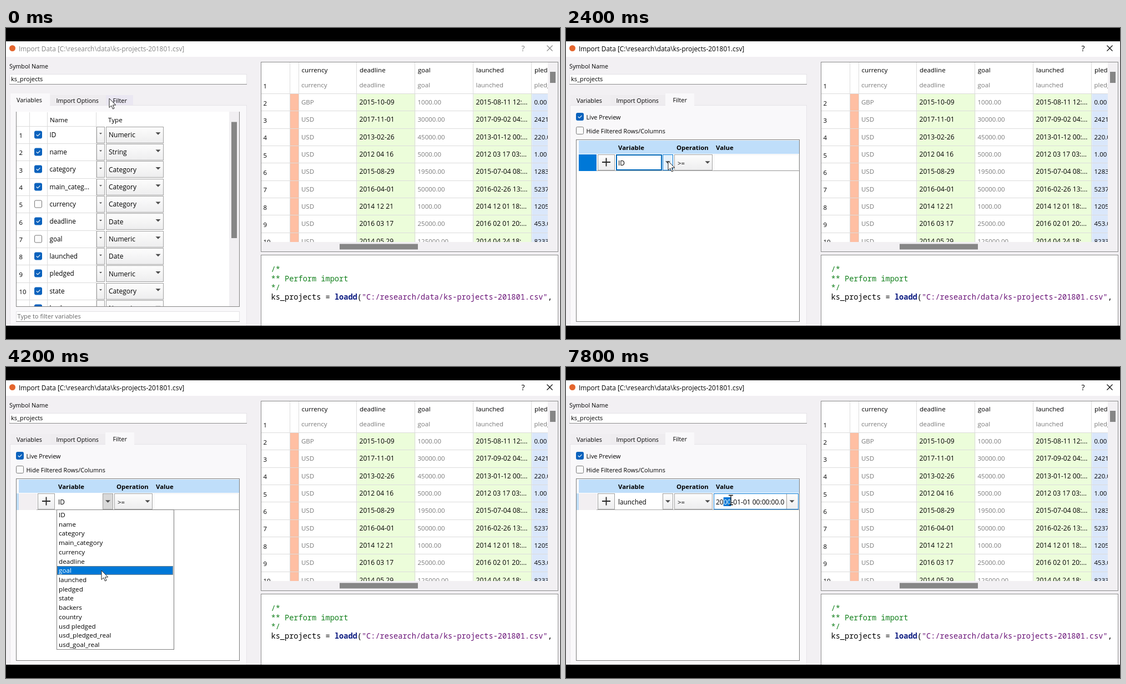
An HTML page with a canvas for the animation above (8000 ms loop, 998 by 561 pixels).

```html
<!DOCTYPE html>
<html lang="en">
<head>
<meta charset="utf-8">
<title>Import Data</title>
<style>
html, body { margin: 0; width: 100%; height: 100%; overflow: hidden; background: #000; }
canvas { display: block; width: 998px; height: 561px; }
</style>
</head>
<body>
<canvas id="stage" width="998" height="561"></canvas>
<script>
const ctx = document.getElementById('stage').getContext('2d');
const LOOP = 8000, STEP = 200, ROW = 31.34, ITEM = 16.71;
const BLUE = '#0078d7', GREY = '#7a7a7a', INK = '#000', GRID = '#dcdcdc', EDGE = '#a0a0a0';

const NAMES = ['ID', 'name', 'category', 'main_category', 'currency', 'deadline', 'goal', 'launched',
  'pledged', 'state', 'backers', 'country', 'usd pledged', 'usd_pledged_real', 'usd_goal_real'];
const TYPES = ['Numeric', 'String', 'Category', 'Category', 'Category', 'Date', 'Numeric', 'Date',
  'Numeric', 'Category', 'Numeric'];
const PREVIEW = [
  'currency|deadline|goal|launched|pledged',
  'GBP|2015-10-09|1000.00|2015-08-11 12:...|0.00',
  'USD|2017-11-01|30000.00|2017-09-02 04:...|2421.00',
  'USD|2013-02-26|45000.00|2013-01-12 00:...|220.00',
  'USD|2012 04 16|5000.00|2012 03 17 03:...|1.00',
  'USD|2015-08-29|19500.00|2015-07-04 08:...|1283.00',
  'USD|2016-04-01|50000.00|2016-02-26 13:...|5237.00',
  'USD|2014 12 21|1000.00|2014 12 01 18:...|1205.00',
  'USD|2016 03 17|25000.00|2016 02 01 20:...|453.00',
  'USD|2014 05 29|125000.00|2014 04 24 18:...|8233.00'
].map(r => r.split('|'));
const COLS = [528, 632.5, 737.5, 842.5, 947.5];

// time, x, y of the pointer
const PATH = [[0, 186, 127], [200, 205, 127], [1200, 205, 127], [2400, 184, 240], [3000, 183, 242],
  [3400, 183, 244], [4200, 172, 367], [4600, 171, 388], [5200, 171, 388], [6400, 286, 242],
  [7000, 286, 242], [7800, 297, 240], [8000, 297, 240]];

function box(x, y, w, h, fill, line) {
  if (fill) { ctx.fillStyle = fill; ctx.fillRect(x, y, w, h); }
  if (line) {
    ctx.strokeStyle = line;
    ctx.lineWidth = 1;
    ctx.strokeRect(x + .5, y + .5, w - 1, h - 1);
  }
}

function text(s, x, mid, size = 10.9, color = INK, weight = 400, family = '"Open Sans", sans-serif') {
  ctx.font = `${weight} ${size}px ${family}`;
  ctx.fillStyle = color;
  ctx.fillText(s, x, mid + 4);
}

function poly(points, fill, line, width = 1) {
  ctx.beginPath();
  points.forEach(([x, y]) => ctx.lineTo(x, y));
  ctx.closePath();
  if (fill) { ctx.fillStyle = fill; ctx.fill(); }
  if (line) { ctx.strokeStyle = line; ctx.lineWidth = width; ctx.stroke(); }
}

function stroke(color, width, ...segments) {
  ctx.strokeStyle = color;
  ctx.lineWidth = width;
  ctx.beginPath();
  for (const [x1, y1, x2, y2] of segments) { ctx.moveTo(x1, y1); ctx.lineTo(x2, y2); }
  ctx.stroke();
}

function clipped(x, y, w, h, draw) {
  ctx.save();
  ctx.beginPath();
  ctx.rect(x, y, w, h);
  ctx.clip();
  draw();
  ctx.restore();
}

function arrowDown(x, y, r = 4.5) {
  poly([[x - r, y - r / 2], [x + r, y - r / 2], [x, y + r / 2]], '#4c4c4c');
}

function button(x, y, w, h, line = EDGE, tint) {
  const g = ctx.createLinearGradient(0, y, 0, y + h);
  g.addColorStop(0, tint || '#fdfdfd');
  g.addColorStop(1, tint || '#ededee');
  box(x, y, w, h, g, line);
}

function check(x, y, on) {
  ctx.beginPath();
  ctx.roundRect(x - 6.5, y - 6.5, 13, 13, 2);
  ctx.fillStyle = on ? '#0a62bd' : '#fbfbfb';
  ctx.fill();
  ctx.strokeStyle = on ? '#0a62bd' : '#777';
  ctx.lineWidth = 1;
  ctx.stroke();
  if (on) stroke('#fff', 1.1, [x - 3.2, y, x - .8, y + 2.4], [x - .8, y + 2.4, x + 3.4, y - 2.2]);
}

function pointerAt(t) {
  const i = Math.max(1, PATH.findIndex(p => p[0] >= t));
  const [t0, x0, y0] = PATH[i - 1], [t1, x1, y1] = PATH[i];
  const u = (t - t0) / (t1 - t0), e = u * u * (3 - 2 * u);
  return [x0 + (x1 - x0) * e, y0 + (y1 - y0) * e];
}

function drawWindow(active) {
  box(0, 0, 998, 561, '#000');
  box(0, 24, 998, 513, '#f2f0f3');
  box(0, 24, 998, 28, '#fff');
  ctx.fillStyle = '#e4652d';
  ctx.beginPath();
  ctx.arc(11.5, 36.5, 5.5, 0, 7);
  ctx.fill();
  const c = active ? INK : '#858585';
  text('Import Data [C:\\research\\data\\ks-projects-201801.csv]', 23, 37.5, 11.85, c);
  text('?', 928.5, 37.5, 14, c);
  stroke(c, 1.1, [974.5, 31.5, 984.5, 41.5], [984.5, 31.5, 974.5, 41.5]);
  text('Symbol Name', 6, 69, 10.75);
  box(6, 83, 428, 19, '#fff', '#e6e4e7');
  box(6, 101, 428, 1, '#8e8e8e');
  text('ks_projects', 9, 92, 11.1);
}

function drawTabs(filterOpen) {
  box(7, 139, 427, 410, '#f9f8fa', '#e6e4e8');
  box(8, 121, 72, 18, '#f0eef1');
  box(80, 121, 100, 18, '#eeecef');
  box(180, 121, 49, 18, filterOpen ? '#f0eef1' : '#eae7f2');
  if (filterOpen) box(179, 118, 52, 23, '#f9f8fa');
  else box(8, 118, 71, 23, '#f9f8fa');
  text('Variables', 19, filterOpen ? 131 : 130, 10.8);
  text('Import Options', 90.5, 131, 10.7);
  text('Filter', 192.5, filterOpen ? 130 : 131, 10.8);
}

function drawVariables() {
  box(18, 151, 403, 352, '#fff');
  clipped(18, 151, 403, 351, () => {
    text('Name', 79, 166, 11.6);
    text('Type', 184, 166, 11.6);
    box(402, 151, 18, 352, '#f1eff2');
    for (let i = 0; i < 11; i++) {
      const y = 192.5 + ROW * i, top = Math.round(y - 15), name = NAMES[i];
      box(19, top - 1, 144, 1, GRID);
      text(String(i + 1), 23.5, y + 1.5, 11.4);
      check(58, Math.round(y) - .5, i !== 4 && i !== 6);
      text(name.length > 10 ? name.slice(0, 10) + '...' : name, 78.5, y, 11.75);
      button(163, top, 15, 30);
      arrowDown(170.5, y - 2, 2.5);
      button(180, top, 104, 30);
      text(TYPES[i], 185, y + .5, 12);
      arrowDown(274, y - 2);
    }
    for (const x of [42, 74, 162]) box(x, 152, 1, 351, GRID);
  });
  box(406, 169.5, 10, 209.5, '#868686');
  box(18, 151, 1, 352, '#858585');
  box(420, 151, 1, 352, '#858585');
  box(18, 502, 403, 1, '#858585');
  box(18, 511, 403, 19, '#fff', '#e4e2e5');
  box(18, 529, 403, 1, '#8e8e8e');
  text('Type to filter variables', 20.5, 520, 11.1, '#666');
}

function drawFilter(t, px) {
  const picking = t >= 3000 && t < 5000, editing = t >= 7200;
  const chosen = t >= 5000, rowSelected = !picking && !editing;
  check(25, 160, true);
  text('Live Preview', 36.5, 161);
  check(25, 185, false);
  text('Hide Filtered Rows/Columns', 36.5, 186, 10.85);

  box(18, 201, 403, 329, '#fff', '#7c7c7c');
  box(23, 203, 397, 24, '#bfdefa');
  text('Variable', 94, 216, 11.4, INK, 700);
  text('Operation', 199, 216, 11.4, INK, 700);
  text('Value', 270, 216, 11.4, INK, 700);

  if (rowSelected) box(23, 228, 32, 30, BLUE);
  else {
    box(19, 228, 4, 30, '#bfdefa');
    box(23, 228, 33, 30, '#f2eff2');
  }
  box(55, 257, 365, 1, '#a9a9a9');
  button(57, 228, 31, 29);
  stroke('#222', 1.8, [65, 242, 80, 242], [72.5, 234.5, 72.5, 249.5]);
  box(90, 228, 83, 29, '#fff');
  if (rowSelected) {
    ctx.strokeStyle = '#0067b8';
    ctx.lineWidth = 2;
    ctx.strokeRect(91, 229, 81, 27);
  }
  text(chosen ? 'launched' : 'ID', 94, 243.5, 11.8);
  if (t === 3000) box(106, 235, 1, 16, INK);

  const hover = t >= 2400 && t <= 3000, pressed = t > 3000 && t < 5000;
  button(174, 228, 19, 29, hover ? BLUE : EDGE, hover ? '#e5f1fb' : pressed ? '#d8d8d8' : '');
  arrowDown(183.5, 242.5);
  button(195, 228, 69, 29);
  text('>=', 201, 243.5, 11.4);
  arrowDown(255, 242.5);

  box(266, 228, 153, 29, '#fff', chosen ? '#b4b4b4' : '#f0f0f0');
  box(266, 257, 153, 1, EDGE);
  if (chosen) {
    const date = '2000-01-01 00:00:00.0';
    text(date, 270, 243.5, 12);
    button(397, 228, 22, 29);
    arrowDown(407, 242.5);
    if (editing) {
      box(266, 228, 153, 29, null, BLUE);
      const n = Math.max(0, Math.round((px - 284) / 6.9));
      if (n) {
        ctx.font = '12px "Open Sans", sans-serif';
        const x = 270 + ctx.measureText('20').width;
        const s = date.slice(2, 2 + n), w = ctx.measureText(s).width;
        box(x, 235, w, 16, BLUE);
        text(s, x, 243.5, 12, '#fff');
      }
    }
  }
}

function drawPopup(t, py) {
  const shift = t === 3000 ? -80.5 : 0;
  const hot = py > 258 ? Math.floor((py - 258.6) / ITEM) : 0;
  clipped(91, 255, 212, 256, () => {
    box(91, 257 + shift, 212, 253, '#fff', '#828282');
    box(302, 258 + shift, 1, 252, '#777');
    NAMES.forEach((name, i) => {
      const y = 267 + shift + ITEM * i, on = !shift && i === hot;
      if (on) {
        const top = Math.round(y - 8.5);
        box(92, top, 209, 16, BLUE);
        ctx.setLineDash([1, 1]);
        ctx.lineDashOffset = .5;
        box(92, top, 209, 16, null, '#e08a3c');
        ctx.setLineDash([]);
      }
      text(name, 95, y, 11.65, on ? '#fff' : INK);
    });
    if (shift) box(302, 255, 1, 174, '#fff');
  });
}

function drawPreview() {
  box(459, 61, 536, 343, '#fff', '#8b8b8b');
  box(976, 62, 18, 341, '#f2f0f3');
  box(460, 386, 534, 17, '#f2f0f3');
  clipped(460, 62, 516, 324, () => {
    box(512, 118.5, 16, 268, '#ffbfa3');
    box(COLS[1], 118.5, 105, 268, '#ecfdda');
    box(COLS[3], 118.5, 105, 268, '#ecfdda');
    box(COLS[4], 118.5, 30, 268, '#dae7fb');
    for (const x of [512, ...COLS]) box(Math.floor(x) - 1, 62, 1, 325, GRID);
    PREVIEW[0].forEach((s, c) => text(s, COLS[c] + 4.5, 76, 11.6));
    PREVIEW.forEach((cells, r) => {
      const y = r ? 134 + ROW * (r - 1) : 103;
      if (r) box(460, Math.round(y - 16), 516, 1, GRID);
      text(String(r + 1), 463.5, y + 1.5, 11.4);
      cells.forEach((s, c) => {
        const dated = c === 1 || c === 3;
        const soft = !r || c === 0 || c === 2;
        text(s, COLS[c] + 4, y, r && dated ? 12.1 : 11.5, soft ? GREY : INK);
      });
    });
  });
  box(980, 79, 10, 20, '#868686');
  box(601, 389.5, 141, 10, '#868686');
}

function drawCode() {
  box(459, 409, 536, 128, '#fff');
  box(459, 409, 536, 1, '#8b8b8b');
  box(459, 409, 1, 128, '#8b8b8b');
  box(994, 409, 1, 128, '#8b8b8b');
  const mono = '"Noto Sans Mono", monospace';
  const code = (s, col, y, color, weight = 400) =>
    text(s, 477.5 + col * 8.17, y, 13.62, color, weight, mono);
  code('/*', 0, 436, '#12801c');
  code('** Perform import', 0, 452.5, '#12801c');
  code('*/', 0, 469, '#12801c');
  code('ks_projects = ', 0, 485.5, INK);
  code('loadd', 14, 485.5, '#0b1a80', 600);
  code('(', 19, 485.5, INK);
  code('"C:/research/data/ks-projects-201801.csv"', 20, 485.5, '#6a1478');
  code(',', 61, 485.5, INK);
}

function drawPointer(t, x, y) {
  if (t >= 5400 && x > 266 && y < 258) {
    const top = y - 8.5, end = y + 8.5;
    stroke('#111', 1.3, [x, top, x, end], [x - 4, top, x + 4, top], [x - 4, end, x + 4, end]);
    return;
  }
  const shape = [[0, 0], [0, 16.5], [3.8, 13], [6.4, 19], [9, 18], [6.5, 12], [11.7, 12]];
  poly(shape.map(([a, b]) => [x + a, y + b]), '#fff', '#222');
}

function draw(t) {
  const [x, y] = pointerAt(t), filterOpen = t >= 1200;
  drawWindow(filterOpen);
  drawTabs(filterOpen);
  if (filterOpen) drawFilter(t, x);
  else drawVariables();
  if (t >= 3000 && t < 5000) drawPopup(t, y);
  drawPreview();
  drawCode();
  box(0, 537, 998, 24, '#000');
  drawPointer(t, x, y);
}

const start = performance.now();
function tick() {
  const t = (performance.now() - start) % LOOP;
  draw(Math.floor(t / STEP) * STEP);
  requestAnimationFrame(tick);
}
tick();
</script>
</body>
</html>
```
